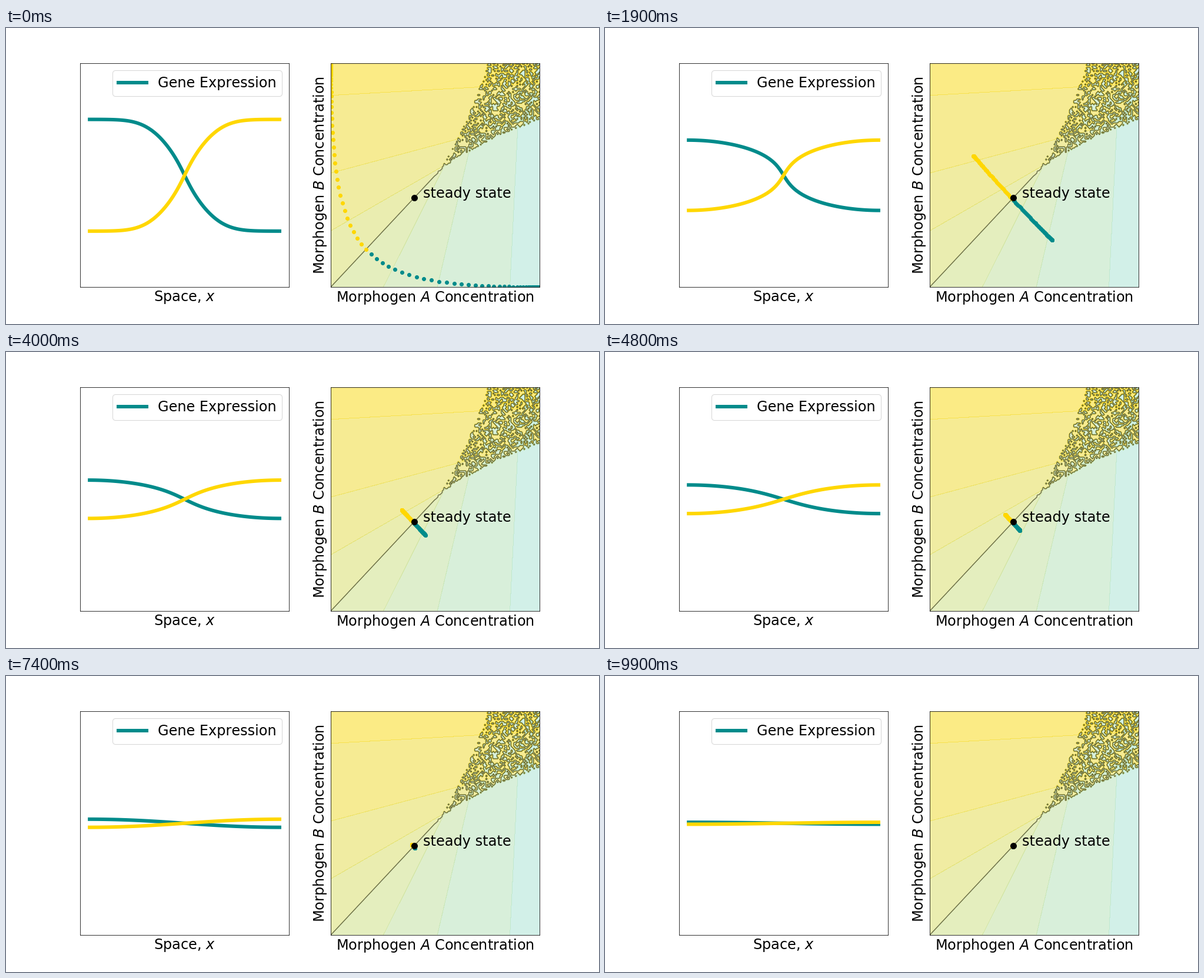
A matplotlib script that plays this animation: 1008 by 504 pixels, repeating every 10000 ms.

```python
import numpy as np
import matplotlib.pyplot as plt
from matplotlib.animation import FuncAnimation
from matplotlib.colors import LinearSegmentedColormap

TEAL, GOLD = "darkcyan", "gold"
FONT = 24
CELLS = 101
SOURCE = 40     # cells filled with morphogen at the start
SPREAD = 60     # diffusion per frame, in cells squared
FRAMES = 100

x = np.linspace(0, 1, CELLS)
centres = (np.arange(CELLS) + 0.5) / CELLS
share = SOURCE / CELLS
modes = np.arange(1, 40)
weights = 2 / (modes * np.pi) * np.sin(share * modes * np.pi)
waves = np.cos(np.pi * np.outer(centres, modes))
rates = SPREAD * (np.pi * modes / CELLS) ** 2


def morphogens(frame):
    """Two mirrored steps diffusing between closed walls."""
    a = share + waves @ (weights * np.exp(-rates * (frame + 1)))
    return a, a[::-1]


def switch(a, b, start=0.0):
    """Steady state of u' = a(1 + u) - b(1 - u) - u - u^3."""
    p, q = 1 - a - b, a - b
    disc = q**2 / 4 + p**3 / 27
    root = np.sqrt(np.maximum(disc, 0))
    single = np.cbrt(q / 2 + root) + np.cbrt(q / 2 - root)

    # Three roots inside the cusp: the start value picks the branch.
    r = np.sqrt(np.maximum(-p, 1e-12) / 3)
    angle = np.arccos(np.clip(q / (2 * r**3), -1, 1)) / 3
    high = 2 * r * np.cos(angle)
    low = 2 * r * np.cos(angle + 2 * np.pi / 3)
    mid = -high - low
    return np.where(disc >= 0, single, np.where(start > mid, high, low))


def bare(ax, xlabel, ylabel=""):
    ax.set_xticks([])
    ax.set_yticks([])
    ax.set_xlabel(xlabel, fontsize=FONT)
    ax.set_ylabel(ylabel, fontsize=FONT)


plt.rcParams["font.family"] = "DejaVu Sans"
plt.rcParams["text.kerning_factor"] = 6
fig, (left, right) = plt.subplots(1, 2, figsize=(14, 7), dpi=72)
fig.subplots_adjust(left=0.125, right=0.9, bottom=0.125, top=0.88, wspace=0.2)

# Gene expression across space
teal_line, = left.plot(x, x, color=TEAL, lw=6, label="Gene Expression")
gold_line, = left.plot(x, x, color=GOLD, lw=6)
left.set_xlim(-0.05, 1.05)
left.set_ylim(-0.5, 1.5)
left.legend(loc="upper right", fontsize=FONT)
bare(left, "Space, $x$")

# Phase plane with its bistable wedge
rng = np.random.RandomState(3)
grid = np.linspace(0, 1, 150)
ga, gb = np.meshgrid(grid, grid)
state = -switch(ga, gb, rng.uniform(-2.4, 1.6, ga.shape))
cmap = LinearSegmentedColormap.from_list("fate", [(0.63, 0.89, 0.88), GOLD])
right.contourf(ga, gb, state, levels=np.linspace(-1.2, 1.2, 9),
               cmap=cmap, alpha=0.5)
right.contour(ga, gb, state, levels=[0], colors="k", alpha=0.5, linewidths=1.5)
teal_dots, = right.plot([], [], "o", color=TEAL, ms=6)
gold_dots, = right.plot([], [], "o", color=GOLD, ms=6)
right.plot(0.4, 0.4, "o", color="k", ms=10)
right.text(0.443, 0.4, "steady state", fontsize=FONT)
right.set_xlim(0, 1)
right.set_ylim(0, 1)
bare(right, "Morphogen $A$ Concentration", "Morphogen $B$ Concentration")


def draw(frame):
    a, b = morphogens(frame)
    gene = (1 + switch(a, b)) / 2
    teal_line.set_ydata(gene)
    gold_line.set_ydata(1 - gene)
    half = CELLS // 2
    teal_dots.set_data(a[:half], b[:half])
    gold_dots.set_data(a[half:], b[half:])
    return teal_line, gold_line, teal_dots, gold_dots


anim = FuncAnimation(fig, draw, frames=FRAMES, interval=100,
                     repeat=True, repeat_delay=0)
plt.show()
```
